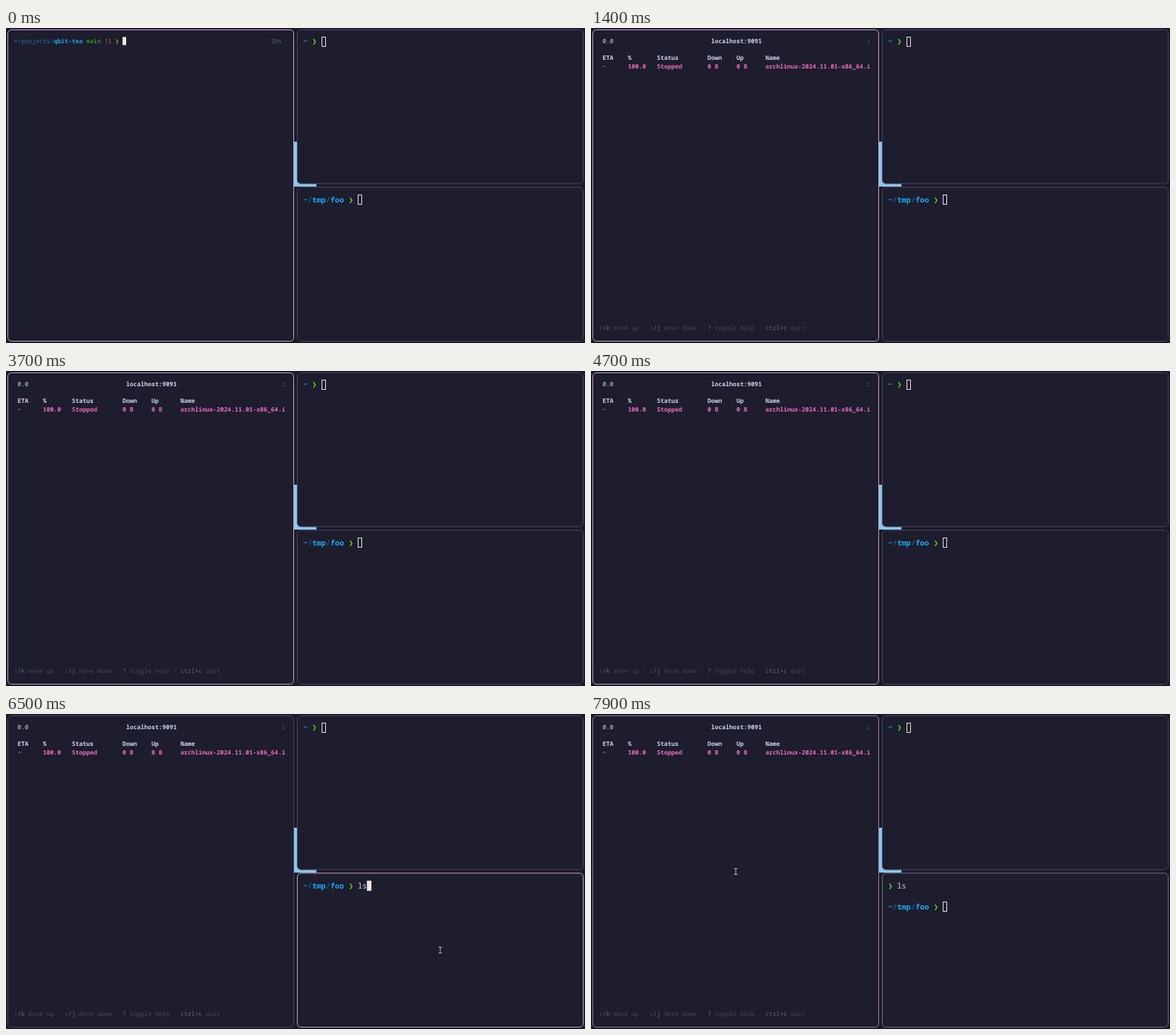
Animation of 800x435 px, one loop 8000 ms. Source, as an HTML page with a canvas:

```html
<!DOCTYPE html>
<html lang="en">
<head>
<meta charset="utf-8">
<title>Tiled terminals</title>
<style>
html, body { margin: 0; height: 100%; overflow: hidden; background: #1b1a29; }
canvas { display: block; }
</style>
</head>
<body>
<canvas id="stage" width="800" height="435"></canvas>
<script>
const ctx = document.getElementById('stage').getContext('2d');
const LOOP = 8000;
const C = {
  gap: '#1b1a29', pane: '#1d1d2d', wallpaper: '#8ac6ee', cursor: '#f2e3e2',
  text: '#cdd4f0', command: '#b9c1e4', anchor: '#1ca6ee', path: '#1b7fae',
  green: '#63dc22', branch: '#50bb25', changes: '#c9698f', timer: '#4d7a55',
  row: '#ea6dba', label: '#efbfe2', value: '#5b5b69', dots: '#2f2f40',
  frame: '#373746', key: '#6a6a73', hint: '#484853', sep: '#3d3d49'
};

// Each grid maps columns and rows to stage positions.
const LEFT = { x: 11, y: 20.6, w: 5, h: 11.65, size: 8.33 };
const TOP = { x: 410.4, y: 22, w: 6.3, h: 14.6, size: 10.5 };
const BOTTOM = { ...TOP, y: 240.5 };

const PANES = [
  { x: 2.5, y: 2.5, w: 395, h: 430 },
  { x: 402.5, y: 2.5, w: 395, h: 212.5 },
  { x: 402.5, y: 219.8, w: 395, h: 212.7 }
];
const POINTERS = [[200, 217.5], [600, 109], [600, 326]];

// Moments at which a pane takes the focus.
const FOCUS = [
  { at: 0, pane: 0 }, { at: 5000, pane: 1 },
  { at: 5900, pane: 2 }, { at: 7600, pane: 0 }
];
const RECALL = 200, RUN = 600, APP = 900, LOADED = 1000;
const DETAILS = 2200, BACK = 2800;
const TYPE_L = 6300, TYPE_S = 6400, ENTER = 7000;

const COMMAND = 'DEBUG=1 go run main.go -u arch -p linux';
const DETAIL_ROWS = [
  ['ID', '1'],
  ['Name', 'archlinux-2024.11.01-x86_64.iso'],
  ['Status', 'Stopped'],
  ['AddedDate', '23 hours ago'],
  ['LeftUntilDone', '0'],
  ['Eta', '-1'],
  ['UploadRatio', '0'],
  ['RateDownload', '0'],
  ['RateUpload', '0'],
  ['DownloadDir', '/home/mekoa/tmp'],
  ['IsFinished', 'false'],
  ['PercentDone', '100%'],
  ['SeedRatioMode', '0'],
  ['HashString', '186e418c3db64cf184f505ef85d4fa30928e6252']
];
const QUIT_HELP = [['?', 'toggle help'], ['ctrl+c', 'quit']];
const LIST_HELP = [['↑/k', 'move up'], ['↓/j', 'move down'], ...QUIT_HELP];
const DETAIL_HELP = [['Esc/i', 'go back'], ...QUIT_HELP];

// Writes text in a grid and returns the column after it.
function put(grid, col, row, text, color, bold) {
  ctx.font = `${bold ? 'bold ' : ''}${grid.size}px "Noto Sans Mono", "DejaVu Sans Mono", monospace`;
  ctx.fillStyle = color;
  ctx.fillText(text, grid.x + col * grid.w, grid.y + row * grid.h);
  return col + text.length;
}

function putRuns(grid, row, runs) {
  let col = 0;
  for (const run of runs) col = put(grid, col, row, ...run);
  return col;
}

function cursor(grid, col, row, filled) {
  const x = grid.x + col * grid.w;
  const y = grid.y + row * grid.h - grid.size * 0.98;
  const h = grid.h * 0.96;
  if (filled) {
    ctx.fillStyle = C.cursor;
    ctx.fillRect(x, y, grid.w, h);
  } else {
    ctx.strokeStyle = C.cursor;
    ctx.strokeRect(Math.round(x) + 0.5, Math.round(y) + 0.5, 5, 13);
  }
}

function help(items) {
  let col = 0;
  items.forEach(([key, hint], i) => {
    if (i) col = put(LEFT, col, 34, ' · ', C.sep);
    col = put(LEFT, col, 34, key, C.key) + 1;
    col = put(LEFT, col, 34, hint, C.hint);
  });
}

function shell(t) {
  const prompt = t < RUN
    ? [['~', C.anchor, true], ['/projects/', C.path], ['qbit-tea', C.anchor, true],
       [' main', C.branch], [' !1', C.changes], [' ❯ ', C.green]]
    : [['❯ ', C.green]];
  if (t >= RECALL) prompt.push([COMMAND, C.command]);
  cursor(LEFT, putRuns(LEFT, 0, prompt), 0, true);
  if (t < RUN) put(LEFT, 71, 0, '29s', C.timer);
}

function list(t) {
  const columns = [1, 8, 16, 30, 38, 46];
  const line = (row, cells, color) =>
    cells.forEach((cell, i) => put(LEFT, columns[i], row, cell, color, true));
  put(LEFT, 1, 0, '0.0', C.text);
  put(LEFT, 31, 0, 'localhost:9091', C.text, true);
  put(LEFT, 74, 0, ':', C.text);
  line(2, ['ETA', '%', 'Status', 'Down', 'Up', 'Name'], C.text);
  if (t >= LOADED) {
    line(3, ['~', '100.0', 'Stopped', '0 B', '0 B', 'archlinux-2024.11.01-x86_64.i'], C.row);
  }
  help(LIST_HELP);
}

function details() {
  ctx.strokeStyle = C.frame;
  ctx.strokeRect(12.5, 16.5, 372, 200);
  ctx.strokeRect(14.5, 18.5, 368, 196);
  DETAIL_ROWS.forEach(([label, value], i) => {
    const row = i + 2, start = 71 - value.length;
    const col = put(LEFT, 4, row, label, C.label, true);
    put(LEFT, col, row, '.'.repeat(start - col), C.dots);
    put(LEFT, start, row, value, C.value);
  });
  help(DETAIL_HELP);
}

function rightShells(t, focused) {
  const home = [['~', C.anchor, true], [' ❯ ', C.green, true]];
  cursor(TOP, putRuns(TOP, 0, home), 0, focused === 1);

  const done = t >= ENTER;
  const row = done ? 2 : 0;
  const typed = done || t < TYPE_L ? '' : t < TYPE_S ? 'l' : 'ls';
  if (done) putRuns(BOTTOM, 0, [['❯ ', C.green, true], ['ls', C.text]]);
  const col = putRuns(BOTTOM, row, [
    ['~', C.anchor, true], ['/', C.path], ['tmp', C.anchor, true], ['/', C.path],
    ['foo', C.anchor, true], [' ❯ ', C.green, true], [typed, C.text]
  ]);
  cursor(BOTTOM, col, row, focused === 2);
}

function pointer(x, y) {
  for (const [color, width] of [['#11111a', 2.4], ['#c9c9d2', 1]]) {
    ctx.strokeStyle = color;
    ctx.lineWidth = width;
    ctx.beginPath();
    ctx.moveTo(x - 2.5, y - 4); ctx.lineTo(x + 2.5, y - 4);
    ctx.moveTo(x, y - 4); ctx.lineTo(x, y + 4);
    ctx.moveTo(x - 2.5, y + 4); ctx.lineTo(x + 2.5, y + 4);
    ctx.stroke();
  }
  ctx.lineWidth = 1;
}

function borderColor(glow) {
  const mix = (a, b) => Math.round(a + (b - a) * glow);
  return `rgb(${mix(76, 203)}, ${mix(70, 164)}, ${mix(94, 196)})`;
}

function draw(t) {
  const step = FOCUS.findLastIndex(f => t >= f.at);
  const focused = FOCUS[step].pane;
  const fade = step ? Math.min(1, (t - FOCUS[step].at) / 500) : 1;

  ctx.fillStyle = C.gap;
  ctx.fillRect(0, 0, 800, 435);
  ctx.fillStyle = C.wallpaper;
  ctx.fillRect(367, 157, 62, 62);

  PANES.forEach((p, i) => {
    const wasFocused = step && FOCUS[step - 1].pane === i;
    ctx.beginPath();
    ctx.roundRect(p.x, p.y, p.w, p.h, 5);
    ctx.fillStyle = C.pane;
    ctx.fill();
    ctx.strokeStyle = borderColor(i === focused ? fade : wasFocused ? 1 - fade : 0);
    ctx.stroke();
  });

  if (t < APP) shell(t);
  else if (t >= DETAILS && t < BACK) details();
  else list(t);
  rightShells(t, focused);
  if (step) pointer(...POINTERS[focused]);
}

ctx.textRendering = 'geometricPrecision';
const start = performance.now();
function tick() {
  draw((performance.now() - start) % LOOP);
  requestAnimationFrame(tick);
}
tick();
</script>
</body>
</html>
```
